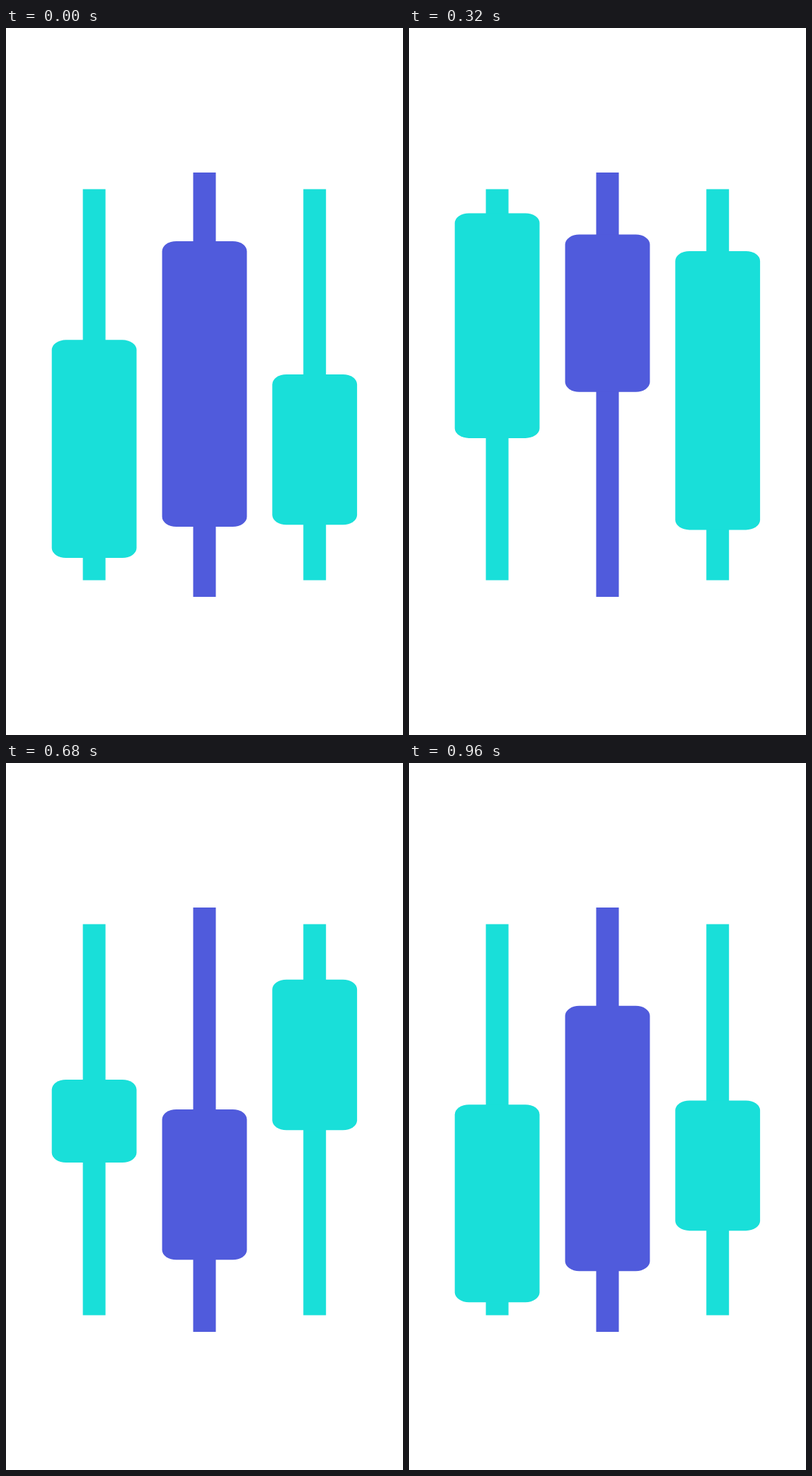
These frames come from a looping animation (561 by 998 pixels, 1 s). An HTML page:

```html
<!DOCTYPE html>
<html lang="en">
<head>
<meta charset="utf-8">
<title>Candles</title>
<style>
  html, body { margin: 0; width: 100%; height: 100%; overflow: hidden; background: #fff; }
  svg { display: block; width: 100%; height: 100%; }
</style>
</head>
<body>
<svg viewBox="0 0 561 998" preserveAspectRatio="none"></svg>
<script>
const svg = document.querySelector('svg');
const LOOP = 1000, STEP = 40, TICKS = 60;

// Edge positions at each quarter of the 60-tick cycle
const TOP = [301, 235, 447, 510];
const BOTTOM = [704, 495.5, 564, 770];

const TEAL = '#19dfd9', BLUE = '#505bdc';
const candles = [
  { x: 124.6, y1: 227.5, y2: 779.5, color: TEAL, lag: 10 },
  { x: 280.5, y1: 204, y2: 803, color: BLUE, lag: 0 },
  { x: 436.2, y1: 227.5, y2: 779.5, color: TEAL, lag: 20 }
];

function rect(attrs) {
  const el = document.createElementNS('http://www.w3.org/2000/svg', 'rect');
  for (const key in attrs) el.setAttribute(key, attrs[key]);
  return svg.appendChild(el);
}

for (const c of candles) {
  rect({ x: c.x - 16, y: c.y1, width: 32, height: c.y2 - c.y1, fill: c.color });
  c.body = rect({ x: c.x - 59.9, width: 119.8, rx: 20, ry: 14, fill: c.color });
}

// Linear interpolation through four evenly spaced, looping keys
function along(keys, tick) {
  const pos = tick / 15, i = Math.floor(pos);
  return keys[i] + (keys[(i + 1) % 4] - keys[i]) * (pos - i);
}

function draw(now) {
  const time = Math.floor((now % LOOP) / STEP) * STEP;
  // Each step shows the last 60 Hz tick completed before it
  const tick = Math.max(0, Math.ceil(time * TICKS / LOOP) - 1);
  for (const c of candles) {
    const phase = (tick - c.lag + TICKS) % TICKS;
    const top = along(TOP, phase);
    c.body.setAttribute('y', top);
    c.body.setAttribute('height', along(BOTTOM, phase) - top);
  }
}

let start;
function loop(now) {
  start ??= now;
  draw(Math.max(0, now - start));
  requestAnimationFrame(loop);
}
draw(0);
requestAnimationFrame(loop);
</script>
</body>
</html>
```
